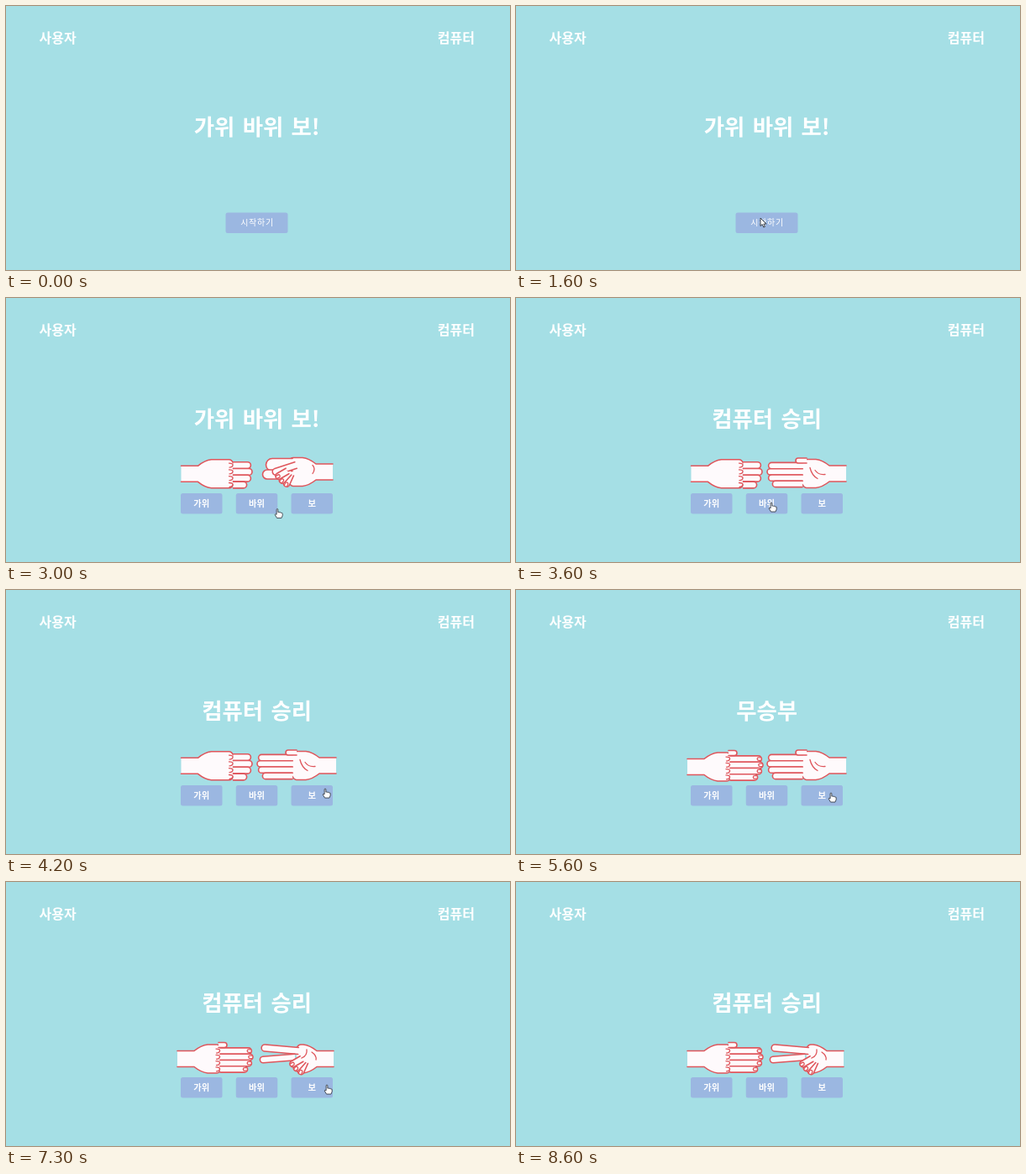
These frames come from a looping animation (600 px wide and 315 px high, 9.1 s). An HTML page:

```html
<!DOCTYPE html>
<html lang="ko">
<head>
<meta charset="utf-8">
<title>가위 바위 보</title>
<style>
  html, body { margin: 0; width: 100%; height: 100%; overflow: hidden; background: #a5dfe5; }
  svg { display: block; width: 600px; height: 315px; }
  text { font-family: "Noto Sans CJK KR", "Noto Sans CJK", sans-serif; font-weight: 700; fill: #fff; text-anchor: middle; }
  .name { font-size: 16px; }
  #title { font-size: 26.4px; word-spacing: 2px; }
  #picks { font-size: 10.3px; }
  #start text { font-size: 10px; font-weight: 400; letter-spacing: .7px; }
  rect { fill: #9bb7e1; }
  .hand { fill: #fefafc; stroke: #df565c; stroke-width: 1.6; stroke-linecap: round; stroke-linejoin: round; }
  .hand .skin { stroke: none; }
  .hand .line { fill: none; stroke-width: 1.3; }
  #cursor path { fill: #fff; stroke: #333b45; stroke-width: 1; stroke-linejoin: round; }
</style>
</head>
<body>
<svg viewBox="0 0 600 315">
  <text class="name" x="61.6" y="43.5">사용자</text>
  <text class="name" x="535.8" y="43.5">컴퓨터</text>
  <text id="title" x="298.7" y="153.8"></text>
  <g id="start">
    <rect x="261.5" y="246.5" width="74" height="24.5" rx="2.5"/>
    <text x="299" y="262.3">시작하기</text>
  </g>
  <g id="game">
    <g id="picks"></g>
    <g id="hands"></g>
  </g>
  <g id="cursor">
    <path id="arrow" d="M0 0V9.500L2.200 7.500L3.800 11L5.400 10.300L3.900 7H7Z"/>
    <path id="finger" transform="translate(0 .8) scale(.88)" d="M-1 1Q0-.8 1 1V5Q2.500 4 3.200 5.300Q4.800 4.500 5.300 5.800Q7 5.500 7 7V9.500L5.600 12.800H-.5L-3.200 8.300Q-3 6.500-1 8Z"/>
  </g>
</svg>

<script>
const LOOP = 9100, STEP = 100, GLIDE = 400;
const $ = id => document.getElementById(id);
const show = (el, on) => { el.style.display = on ? '' : 'none'; };
const line = d => `<path class="line" d="${d}"/>`;
const four = fn => [0, 1, 2, 3].map(fn).join('');

// Hands are built pointing right, from the wrist at the origin.
function palm(len) {
  const side = s => `0 ${9.5 * s}L20 ${9.5 * s}Q28 ${16 * s} 36 ${17 * s}L${len - 3} ${17 * s}Q${len} ${17 * s} ${len + 2} ${13 * s}`;
  const edge = s => `<path class="line" style="stroke-width:1.6" d="M${side(s)}"/>`;
  return `<path class="skin" d="M${side(-1)}V13L${len - 3} 17H36Q28 16 20 9.500H0Z"/>` + edge(-1) + edge(1);
}

// A finger is open at its base, so it merges with the palm.
function finger(x, y, len, w, angle = 0, nail = false) {
  const r = w / 2, n = w * .24;
  return `<g transform="translate(${x} ${y}) rotate(${angle})">
    <path d="M0 ${-r}H${len}a${r} ${r} 0 0 1 0 ${w}H0"/>
    ${nail ? line(`M${len + r - 1} ${-n}h-2.500a${n} ${n} 0 0 0 0 ${2 * n}h2.500`) : ''}</g>`;
}

const rowY = (i, pitch) => 1.5 + (i - 1.5) * pitch;
const row = (base, tip, pitch, nail) => four(i =>
  finger(base, rowY(i, pitch), tip - 1.6 * (i - 1) ** 2 - pitch / 2 - base, pitch, 0, nail));
const knuckles = (x, pitch) => four(i =>
  line(`M${x} ${rowY(i, pitch) - 2.5}q5 0 4.500 2.500t-4 2.500`));
const curled = (x, y) => [2, 1, 0].map(i =>
  finger(x - 2 * i, y + 2 * i, 12, 7.5, 30 + 18 * i, true)).join('');
const creases = line('M43-7Q41 2 34 6M37-4Q33 2 25 1');

const hands = {
  userRock: [208.5, 209.8, 1, palm(60) + row(62, 84.5, 7.8) + knuckles(57, 7.8)],
  userPaper: [204, 211, 1, palm(50) + row(51, 90, 7.3, true) + finger(49, -16.5, 7, 6) + knuckles(46, 7.3)],
  pcRock: [389, 207.5, -1, palm(50) + finger(48, -8.5, 24, 15) + finger(50, 3, 28, 11) +
    finger(44, -8, 25, 8, 18) + curled(54, -1) + line('M24-8Q20-4 24 2')],
  pcPaper: [393, 209.5, -1, palm(50) + row(52, 94, 7.3) + finger(47, -15.5, 10, 6) + creases],
  pcScissors: [390, 211, -1, palm(42) + finger(42, -9.5, 40, 8, -5) + finger(46, -2, 38, 7.5, 4.5) +
    curled(38, 0) + line('M32-11Q31-4 38-1M26-8Q20-4 21 1')]
};
$('hands').innerHTML = Object.entries(hands).map(([id, [x, y, flip, parts]]) =>
  `<g class="hand" id="${id}" transform="translate(${x} ${y}) scale(${flip} 1)">${parts}</g>`).join('');

$('picks').innerHTML = ['가위', '바위', '보'].map((label, i) => {
  const x = 208 + 65.75 * i;
  return `<rect x="${x}" y="233" width="49.5" height="24.5" rx="2.5"/><text x="${x + 24.7}" y="249">${label}</text>`;
}).join('');

// start time, headline, hands on show
const rounds = [
  [0, '가위 바위 보!'],
  [3000, '가위 바위 보!', 'userRock', 'pcRock'],
  [3600, '컴퓨터 승리', 'userRock', 'pcPaper'],
  [5000, '무승부', 'userPaper', 'pcPaper'],
  [6100, '사용자 승리', 'userPaper', 'pcRock'],
  [7000, '컴퓨터 승리', 'userPaper', 'pcScissors']
];

// arrival time and place of each stop of the pointer
const stops = [
  [100, 12, 17], [400, 180, 268], [700, 524, 200], [1000, 291, 253],
  [2000, 573, 175], [2500, 380, 214], [2800, 323, 250.5], [3400, 304, 243],
  [4200, 380, 236], [4800, 375, 241], [7300, 382, 241], [8500, 588, 53]
];

function pointer(t) {
  const i = Math.max(1, stops.findIndex(s => s[0] >= t));
  const [t0, x0, y0] = stops[i - 1], [t1, x1, y1] = stops[i];
  const k = Math.max(0, 1 - (t1 - t) / Math.min(GLIDE, t1 - t0));
  const ease = k * k * (3 - 2 * k);
  return [x0 + (x1 - x0) * ease, y0 + (y1 - y0) * ease];
}

function draw(t) {
  const [, headline, ...shown] = rounds.filter(r => r[0] <= t).pop();
  if ($('title').textContent !== headline) $('title').textContent = headline;
  Object.keys(hands).forEach(id => show($(id), shown.includes(id)));
  show($('start'), t < 3000);
  show($('game'), t >= 3000);

  const visible = t >= 100 && t <= 8500;
  show($('cursor'), visible);
  if (!visible) return;
  const overButton = t >= 2700 && t < 8200;
  show($('finger'), overButton);
  show($('arrow'), !overButton);
  $('cursor').setAttribute('transform', `translate(${pointer(t)})`);
}

const begin = performance.now();
function tick() {
  const t = (performance.now() - begin) % LOOP;
  draw(Math.floor(t / STEP) * STEP);
  requestAnimationFrame(tick);
}
tick();
</script>
</body>
</html>
```
